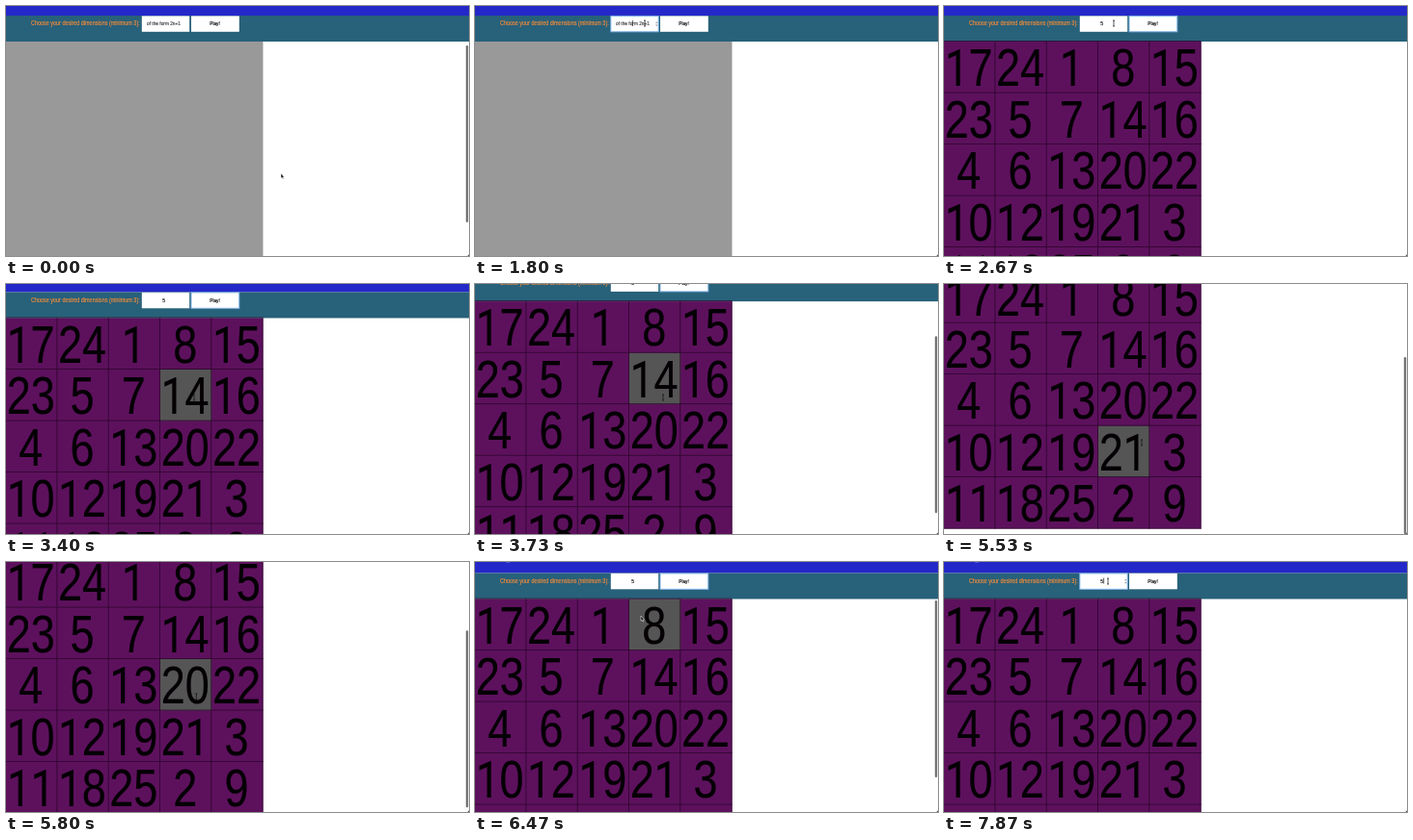
Recreate the animation shown at these times as an HTML page. Size 480 px wide and 260 px high, loop 8 s.

```html
<!DOCTYPE html>
<html lang="en">
<head>
<meta charset="utf-8">
<title>Number square</title>
<style>
  html, body { margin: 0; width: 100%; height: 100%; overflow: hidden; background: #fff; }
  svg { display: block; width: 480px; height: 260px; }
  text { font-family: "Liberation Sans", Arial, sans-serif; white-space: pre; }
  .plain { font-family: Roboto, sans-serif; font-size: 54px; }
</style>
</head>
<body>
<svg id="stage" viewBox="0 0 480 260"></svg>
<script>
const LOOP = 8000, STEP = 1000 / 15, LAG = 70;
const N = 5, CELL_W = 53.3, CELL_H = 53.5, LINE = 0.8, SQUEEZE = 0.81;

// Scroll glides: start, end, distance
const GLIDES = [[-300, 100, 0], [3300, 4000, -28], [5200, 5533, -22], [5600, 6467, 51.5]];

// Pointer stops: time, x, y
const STOPS = [[67, 285, 174], [733, 176, 18], [2933, 176, 18], [3100, 228, 80],
  [3200, 195, 118], [4133, 195, 118], [4467, 60, 45], [4800, 114.5, 74.5],
  [5000, 205, 165], [5600, 205, 165], [6467, 172, 56], [6767, 40, 220], [7200, 170, 20]];

const ramp = (t, a, b) => Math.min(1, Math.max(0, (t - a) / (b - a)));
const smooth = u => u * u * (3 - 2 * u);

const scrollAt = t =>
  GLIDES.reduce((y, [a, b, d]) => y + d * smooth(ramp(t, a, b)), 37);
const barAt = t =>
  Math.max(...GLIDES.map(([a, b]) => t < a + 130 ? 0 : 1 - ramp(t, b + 130, b + 400)));

function pointerAt(t) {
  let [, x, y] = STOPS[0];
  for (let i = 1; i < STOPS.length; i++) {
    const u = ramp(t, STOPS[i - 1][0], STOPS[i][0]);
    x += (STOPS[i][1] - STOPS[i - 1][1]) * u;
    y += (STOPS[i][2] - STOPS[i - 1][2]) * u;
  }
  return [x, y];
}

function add(parent, tag, attrs = {}) {
  const el = document.createElementNS("http://www.w3.org/2000/svg", tag);
  for (const k in attrs) el.setAttribute(k, attrs[k]);
  return parent.appendChild(el);
}
const rect = (parent, x, y, width, height, fill, more) =>
  add(parent, "rect", { x, y, width, height, fill, ...more });

function label(parent, str, x, y, size, fill, anchor = "middle") {
  const el = add(parent, "text", {
    transform: `translate(${x} ${y}) scale(${SQUEEZE} 1)`,
    "font-size": size, fill, stroke: fill, "stroke-width": 0.2, "text-anchor": anchor
  });
  el.textContent = str;
  return el;
}

// Board digits use a footless 1
function digits(parent, n, x, y) {
  const el = label(parent, "", x, y, 55.5, "#040004");
  for (const d of String(n))
    add(el, "tspan", d === "1" ? { class: "plain" } : {}).textContent = d;
}
const show = (el, on) => el.setAttribute("visibility", on ? "visible" : "hidden");
const move = (el, x, y) => el.setAttribute("transform", `translate(${x} ${y})`);

const stage = document.getElementById("stage");
const page = add(stage, "g");

// Header, measured from the top edge of the board
rect(page, 0, -80, 480, 53, "#2528c8");
rect(page, 0, -27, 480, 27, "#28617a");
rect(page, 32, -39, 4, 1, "#7a7fd8");
label(page, "Choose your desired dimensions (minimum 3):", 26, -16.6, 6.75, "#ec8a3c", "start");

function box(x, w) {
  rect(page, x, -26.6, w, 16.4, "#fff");
  return rect(page, x, -26.6, w, 16.4, "none", { stroke: "#7fb2e6" });
}
const fieldRing = box(140.8, 49.4), buttonRing = box(192, 49.8);
const hint = label(page, "of the form 2n+1", 163.5, -16.7, 5.9, "#444");
const typed = label(page, "5", 163.5, -16.7, 5.9, "#111");
label(page, "Play!", 216.5, -16.7, 5.9, "#111");
const caret = rect(page, 0, -22, 0.7, 6, "#222");
const spinner = add(page, "path", {
  d: "M187 -19.2l1.3 -1.6l1.3 1.6zM187 -17.6l1.3 1.6l1.3 -1.6z", fill: "#8a9099"
});

const blank = rect(page, 0, 0, N * CELL_W, 300, "#999");
const board = add(page, "g");
rect(board, 0, 0, N * CELL_W, N * CELL_H, "#5d115d");
const hover = rect(board, 0, 0, CELL_W, CELL_H, "#555");
for (let i = 0; i <= N; i++) {
  rect(board, 0, i * CELL_H - LINE, N * CELL_W, LINE, "#2c062c");
  rect(board, i * CELL_W - LINE, 0, LINE, N * CELL_H, "#2c062c");
}

// Siamese method: step up and right, drop one row after each full run
const square = Array.from({ length: N }, () => []);
for (let n = 1, r = 0, c = N >> 1; n <= N * N; n++) {
  square[r][c] = n;
  digits(board, n, (c + 0.5) * CELL_W - 0.9, r * CELL_H + 46.4);
  if (n % N === 0) r = (r + 1) % N;
  else { r = (r + N - 1) % N; c = (c + 1) % N; }
}

const bar = rect(stage, 476.8, 0, 2.4, 184, "#747474", { rx: 1.2 });
rect(stage, 478.8, 258.8, 1.2, 1.2, "#555");
const arrow = add(stage, "path", {
  d: "M0 0V5.2L1.2 4.2L2 6L2.9 5.6L2.1 3.9H3.5Z",
  fill: "#111", stroke: "#fff", "stroke-width": 0.5
});
const beam = add(stage, "path", {
  d: "M-1 -3H1M0 -3V3M-1 3H1", fill: "none", stroke: "#111", "stroke-width": 0.7
});

const cellAt = (x, y, top) => [Math.floor((y - top) / CELL_H), Math.floor(x / CELL_W)];

// The text pointer appears over the field and over board digits
function overText(x, y, top, played) {
  if (x > 140 && x < 191 && y > top - 27 && y < top - 10) return true;
  const [r, c] = cellAt(x, y, top), n = square[r]?.[c];
  return played && n > 0 && Math.abs(x - (c + 0.5) * CELL_W) < 12 * String(n).length;
}

function draw(ms) {
  const t = Math.floor((ms % LOOP + 4) / STEP) * STEP;
  const after = time => t > time - 10;
  const top = scrollAt(t), [x, y] = pointerAt(t);
  move(page, 0, top);

  const inField = (after(1800) && !after(2470)) || after(7470);
  const hasValue = after(2200), played = after(2670);
  show(fieldRing, inField);
  show(buttonRing, after(2470) && !after(7470));
  show(hint, !hasValue);
  show(typed, hasValue);
  show(caret, inField);
  show(spinner, inField);
  caret.setAttribute("x", hasValue ? 165.4 : 163.2);
  show(blank, !played);
  board.setAttribute("display", played ? "inline" : "none");

  const [row, col] = cellAt(...pointerAt(t - LAG), scrollAt(t - LAG));
  show(hover, square[row]?.[col] > 0);
  move(hover, col * CELL_W, row * CELL_H);

  bar.setAttribute("y", 40 + (38.5 - top) * 0.7);
  bar.setAttribute("opacity", barAt(t));

  const texty = overText(x, y, top, played);
  show(beam, texty);
  show(arrow, !texty);
  move(texty ? beam : arrow, x, y);
}

const start = performance.now();
function tick() {
  draw(performance.now() - start);
  requestAnimationFrame(tick);
}
tick();
</script>
</body>
</html>
```
